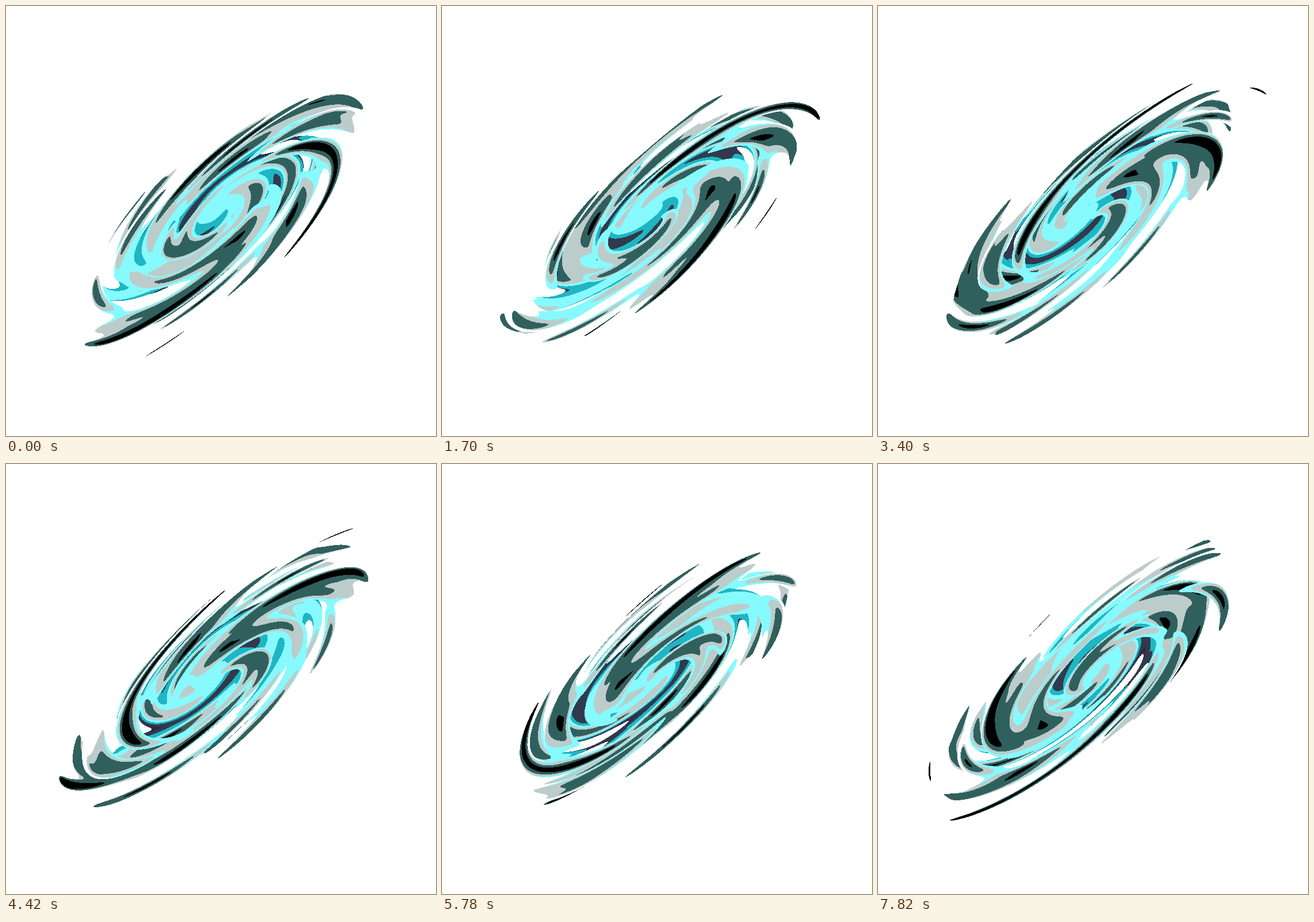
Recreate the animation shown at these times as an HTML page with a canvas. Size 748 by 748 pixels, loop 7.99 s.

```html
<!DOCTYPE html>
<html lang="en">
<head>
<meta charset="utf-8">
<title>Spiral galaxy</title>
<style>
  html, body { margin: 0; width: 100%; height: 100%; overflow: hidden; background: #fff; }
  canvas { display: block; width: 748px; height: 748px; }
</style>
</head>
<body>
<canvas id="stage" width="748" height="748"></canvas>
<script>
const SIZE = 748, FRAME_MS = 170, FRAMES = 47, STEPS_PER_TURN = 60;
const ZOOM = 1.375, TILT = 3, TILT_ANGLE = 0.7, SWIRL = -9;
const NOISE_SCALE = 7, SEED = 3.24, RADIUS = 0.7;
const LAYER_SHIFT = 0.1, LAYER_OFFSET = 2.5;
const COLORS = [0x000000, 0x30605e, 0xbcccca, 0x87faff, 0x20b5c3, 0x32394d, 0x322947];
const SHADE_SCALE = 2.3 * COLORS.length * 0.97;

// ImageData words are stored as ABGR
const toWord = c => (0xff000000 | (c & 255) << 16 | c & 0xff00 | c >> 16) >>> 0;
const WORDS = COLORS.map(toWord), WHITE = toWord(0xffffff);

// Random lattice, covering coordinates from -GRID_MIN upwards
const GRID = 20, GRID_MIN = 5;
const lattice = new Float64Array(GRID * GRID);
for (let j = 0; j < GRID; j++) {
  for (let i = 0; i < GRID; i++) {
    const v = Math.sin((i - GRID_MIN) * 12.9898 + (j - GRID_MIN) * 78.233) * 15.5453 * SEED;
    lattice[j * GRID + i] = v - Math.floor(v);
  }
}

function noise(x, y) {
  x += GRID_MIN;
  y += GRID_MIN;
  const i = Math.floor(x), j = Math.floor(y), k = j * GRID + i;
  const fx = x - i, fy = y - j;
  const sx = fx * fx * (3 - 2 * fx), sy = fy * fy * (3 - 2 * fy);
  const top = lattice[k] + (lattice[k + 1] - lattice[k]) * sx;
  const bottom = lattice[k + GRID] + (lattice[k + GRID + 1] - lattice[k + GRID]) * sx;
  return (top + (bottom - top) * sy) / 2;
}

// Distance from the centre and swirled noise coordinates of a point on the disc
function swirl(x, y) {
  const d = Math.hypot(x, y);
  const angle = Math.atan2(y, x) + SWIRL * d ** 0.4;
  return [d, Math.cos(angle) * d * NOISE_SCALE, Math.sin(angle) * d * NOISE_SCALE];
}

// Everything that does not depend on time: one entry per pixel of the disc
const points = [];
const cosTilt = Math.cos(TILT_ANGLE), sinTilt = Math.sin(TILT_ANGLE);
for (let py = 0; py < SIZE; py++) {
  for (let px = 0; px < SIZE; px++) {
    const u = (px / SIZE - 0.5) * ZOOM, v = (py / SIZE - 0.5) * ZOOM;
    const x = cosTilt * u - sinTilt * v, y = (sinTilt * u + cosTilt * v) * TILT;
    const [d1, x1, y1] = swirl(x, y);
    const [d2, x2, y2] = swirl(x, y + LAYER_SHIFT);
    if (Math.min(d1, d2) < RADIUS) points.push(py * SIZE + px, d1, x1, y1, d2, x2, y2);
  }
}
const disc = Float32Array.from(points);

const ctx = document.getElementById("stage").getContext("2d");
const image = ctx.createImageData(SIZE, SIZE);
const pixels = new Uint32Array(image.data.buffer).fill(WHITE);

function draw(step) {
  const turn = Math.PI + step * 2 * Math.PI / STEPS_PER_TURN;
  const c = Math.cos(turn), s = Math.sin(turn);
  const sample = (x, y, origin) => noise(c * x - s * y + origin, s * x + c * y + origin);
  const middle = NOISE_SCALE / 2;
  for (let n = 0; n < disc.length; n += 7) {
    let d = disc[n + 1];
    let shade = sample(disc[n + 2], disc[n + 3], middle);
    if (shade >= 0.25) {
      // dense regions show the raised layer instead
      d = disc[n + 4];
      shade = sample(disc[n + 5], disc[n + 6], middle + LAYER_OFFSET);
    }
    pixels[disc[n]] = shade + d > RADIUS
      ? WHITE
      : WORDS[Math.min(Math.floor(shade * SHADE_SCALE), WORDS.length - 1)];
  }
  ctx.putImageData(image, 0, 0);
}

let shown = -1;
function tick() {
  const step = Math.floor(performance.now() / FRAME_MS) % FRAMES;
  if (step !== shown) draw(shown = step);
  requestAnimationFrame(tick);
}
tick();
</script>
</body>
</html>
```
